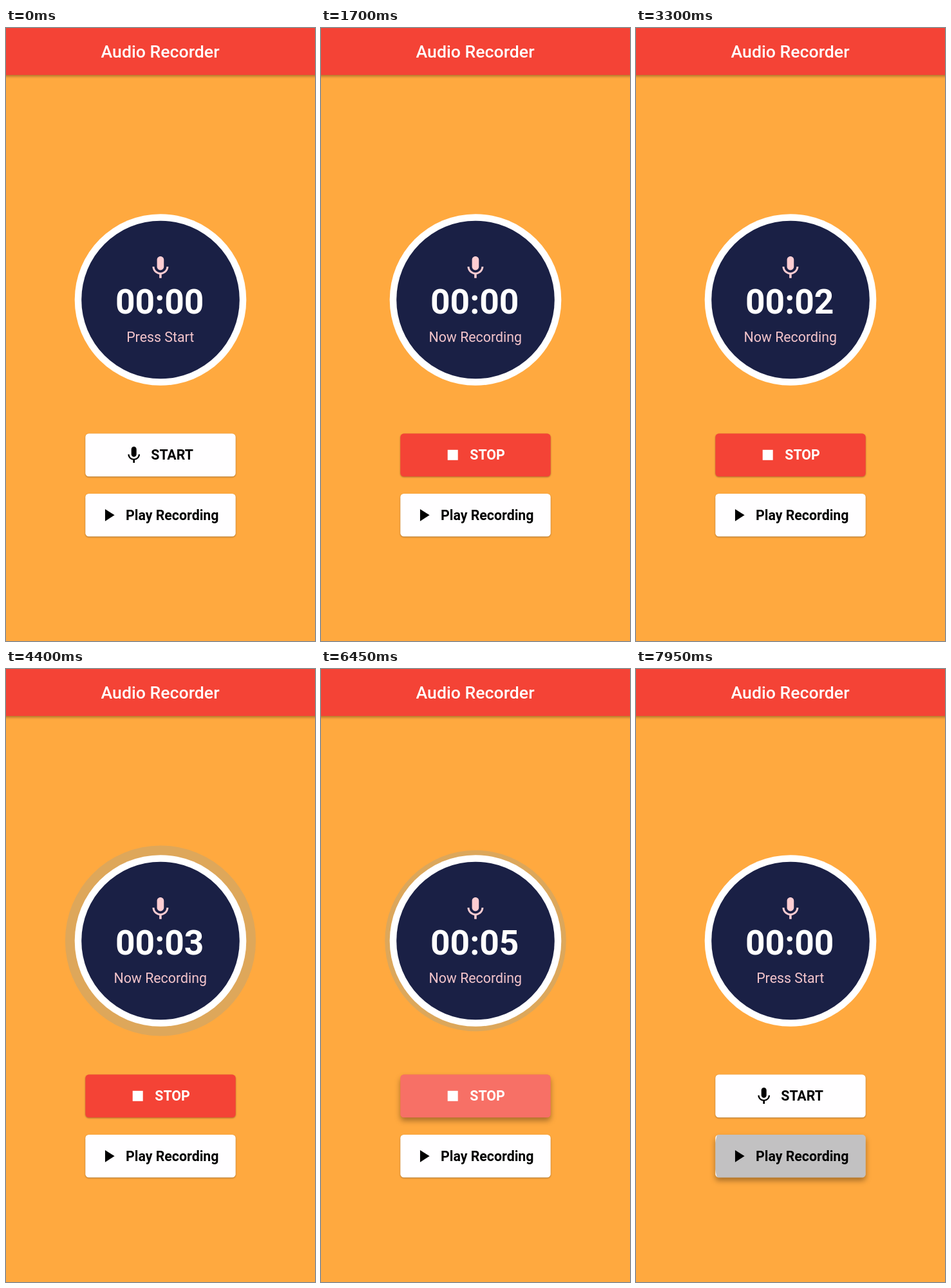
These frames come from a looping animation (480x953 px, 8000 ms). An HTML page:

```html
<!DOCTYPE html>
<html lang="en">
<head>
<meta charset="utf-8">
<title>Audio Recorder</title>
<style>
  html, body { margin: 0; width: 100%; height: 100%; overflow: hidden; background: #ffa93f; }
  svg { display: block; width: 100vw; height: 100vh; }
  text { font-family: Roboto, "Open Sans", sans-serif; white-space: pre; }
  .label { font-size: 21.33px; font-weight: 700; }
  .pink { fill: #ffcdd2; }
</style>
</head>
<body>
<svg viewBox="0 0 480 953" preserveAspectRatio="none">
  <defs>
    <path id="mic" d="M12 14c1.66 0 2.99-1.34 2.99-3L15 5c0-1.66-1.34-3-3-3S9 3.34 9 5v6c0 1.66 1.34 3 3 3zm5.3-3c0 3-2.54 5.1-5.3 5.1S6.7 14 6.7 11H5c0 3.41 2.72 6.23 6 6.72V21h2v-3.28c3.28-.48 6-3.3 6-6.72h-1.7z"/>
    <rect id="box" x="123.3" width="233.4" height="66.7" rx="5.3"/>
    <clipPath id="mainClip"><use href="#box" y="630.6"/></clipPath>
    <clipPath id="playClip"><use href="#box" y="723.9"/></clipPath>
  </defs>
  <rect width="480" height="953" fill="#ffa93f"/>
  <rect id="bar" x="-20" y="-20" width="520" height="93" fill="#f44336"/>
  <text x="239.5" y="46" font-size="26.67" font-weight="500" fill="#fff" text-anchor="middle">Audio Recorder</text>

  <circle id="glow" cx="240" cy="422.5" fill="#2196f3"/>
  <circle cx="240" cy="422.5" r="133.3" fill="#fff"/>
  <circle cx="240" cy="422.5" r="122.8" fill="#1a2045"/>
  <use href="#mic" class="pink" transform="translate(218.6 351.5) scale(1.778)"/>
  <text id="clock" x="170" y="444" font-size="53.33" font-weight="700" fill="#fff"></text>
  <text id="status" class="pink" x="239.7" y="488" font-size="21.33" text-anchor="middle" opacity=".95"></text>

  <use id="mainBox" href="#box" y="630.6"/>
  <g clip-path="url(#mainClip)"><circle id="startInk" fill="#000"/><circle id="stopInk" fill="#fff"/></g>
  <use id="startIcon" href="#mic" transform="translate(182.7 648) scale(1.333)"/>
  <rect id="stopIcon" x="196.7" y="655.8" width="16" height="16" fill="#fff"/>
  <text id="mainLabel" class="label" y="671.3"></text>

  <use id="playBox" href="#box" y="723.9" fill="#fffeff"/>
  <g clip-path="url(#playClip)"><circle id="playInk" fill="#000"/></g>
  <path d="M8 5v14l11-7z" transform="translate(143.3 741.3) scale(1.333)"/>
  <text class="label" x="186" y="764.7">Play Recording</text>
</svg>
<script>
const LOOP = 8000, SECOND = 1000;
const RECORD_ON = 1250, RECORD_OFF = 6950;
const GLOW = { start: 1260, period: 2112, grow: 2000, radius: 186.7 };
const INK_RADIUS = 121.4, INK_ALPHA = .24;

const presses = {
  startInk: { down: 30, up: RECORD_ON, x: 295, y: 673, cy: 664 },
  stopInk: { down: 5260, up: RECORD_OFF, x: 306, y: 673.6, cy: 664 },
  playInk: { down: 7130, up: Infinity, x: 295, y: 766, cy: 757.3 }
};

const el = {};
document.querySelectorAll('[id]').forEach(node => el[node.id] = node);

const clamp = v => Math.max(0, Math.min(1, v));
const mix = (a, b, p) => a + (b - a) * p;
const set = (node, attrs) => Object.entries(attrs).forEach(([k, v]) => node.setAttribute(k, v));
const mixColor = (a, b, p) => `rgb(${a.map((v, i) => Math.round(mix(v, b[i], p)))})`;

function bezier(x1, y1, x2, y2) {
  const axis = (a, b, s) => 3 * a * s * (1 - s) ** 2 + 3 * b * s * s * (1 - s) + s ** 3;
  return x => {
    let lo = 0, hi = 1;
    for (let i = 0; i < 24; i++) {
      const mid = (lo + hi) / 2;
      if (axis(x1, x2, mid) < x) lo = mid; else hi = mid;
    }
    return axis(y1, y2, (lo + hi) / 2);
  };
}
const ease = bezier(.25, .1, .25, 1);
const fastOutSlowIn = bezier(.4, 0, .2, 1);

function drawInk(id, t) {
  const { down, up, x, y, cy } = presses[id];
  const p = ease(clamp((t - down) / 1000));
  const fadeIn = clamp((t - down) / 75);
  const fadeOut = clamp((t - up - 225) / 150);
  set(el[id], {
    cx: mix(x, 240, p), cy: mix(y, cy, p),
    r: INK_RADIUS * mix(.3, 1, p),
    opacity: INK_ALPHA * fadeIn * (1 - fadeOut)
  });
}

function setShadow(node, elevation) {
  node.style.filter = `drop-shadow(0 ${elevation * .66}px ${elevation * .5 + .2}px rgba(0,0,0,.34))`;
}

// Elevation rises from 2 to 8 while the button is held.
function elevationOf(id, t) {
  const { down, up } = presses[id];
  const rise = fastOutSlowIn(clamp((t - down) / 200));
  const fall = fastOutSlowIn(clamp((t - up) / 200));
  return 6 * rise * (1 - fall);
}

function drawGlow(t, recording) {
  const p = clamp(((t - GLOW.start) % GLOW.period) / GLOW.grow);
  const visible = recording && t > GLOW.start;
  set(el.glow, {
    r: visible ? GLOW.radius * fastOutSlowIn(p) : 0,
    opacity: visible ? .3 * (1 - p) : 0
  });
}

function render(t) {
  const recording = t >= RECORD_ON && t < RECORD_OFF;
  const seconds = recording ? Math.max(0, Math.floor((t - RECORD_ON - 20) / SECOND)) : 0;
  el.clock.textContent = '00:0' + seconds;
  el.status.textContent = recording ? 'Now Recording' : 'Press Start';
  drawGlow(t, recording);

  const red = clamp((t - RECORD_ON) / 200) * (1 - clamp((t - RECORD_OFF) / 200));
  set(el.mainBox, { fill: mixColor([255, 254, 255], [244, 67, 54], red) });
  set(el.mainLabel, { x: recording ? 231.3 : 225.3, fill: mixColor([0, 0, 0], [255, 255, 255], red) });
  el.mainLabel.textContent = recording ? 'STOP' : 'START';
  set(el.startIcon, { visibility: recording ? 'hidden' : 'visible' });
  set(el.stopIcon, { visibility: recording ? 'visible' : 'hidden' });

  Object.keys(presses).forEach(id => drawInk(id, t));
  setShadow(el.mainBox, 2 + elevationOf('startInk', t) + elevationOf('stopInk', t));
  setShadow(el.playBox, 2 + elevationOf('playInk', t));
}

setShadow(el.bar, 4);
const origin = performance.now();
function tick() {
  render((performance.now() - origin) % LOOP);
  requestAnimationFrame(tick);
}
tick();
</script>
</body>
</html>
```
